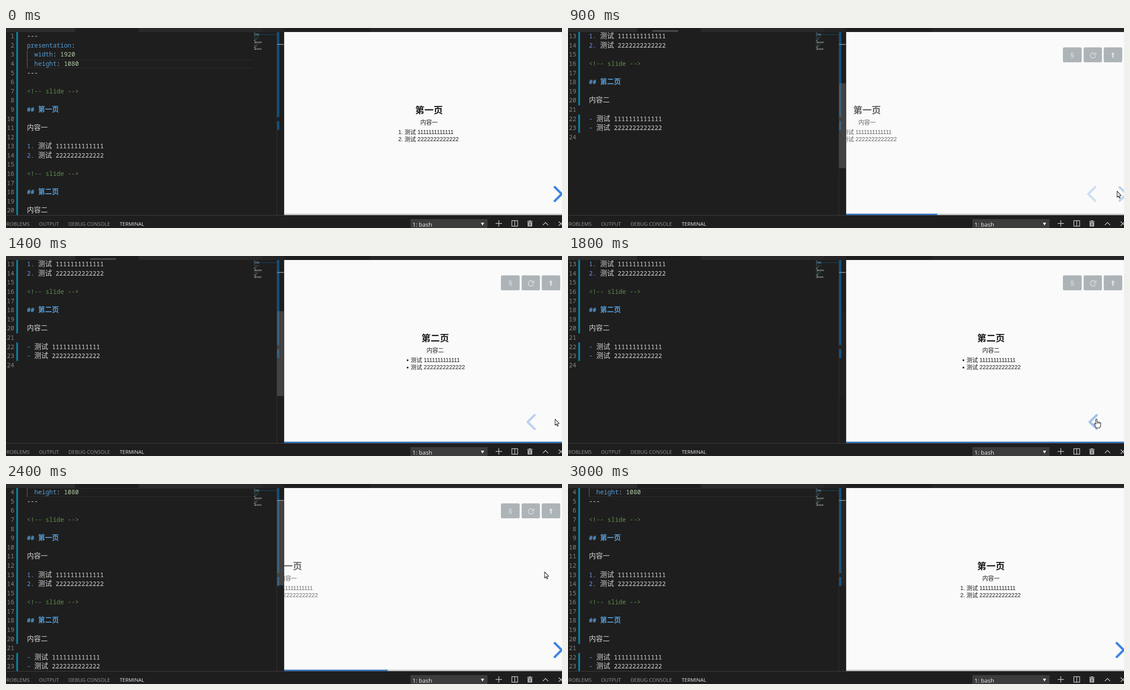
An HTML page with a canvas for the animation above (3200 ms loop, 1247 px wide and 449 px high).

```html
<!DOCTYPE html>
<html lang="zh">
<head>
<meta charset="utf-8">
<title>Slide preview</title>
<style>
  html, body { margin: 0; width: 100%; height: 100%; overflow: hidden; background: #1e1e1e; }
  canvas { display: block; }
</style>
</head>
<body>
<canvas id="stage" width="1247" height="449"></canvas>
<script>
const ctx = document.getElementById('stage').getContext('2d');
const LOOP = 3200, STEP = 100;
const MONO = '13.85px "Noto Sans Mono", monospace';
const HAN = '15.5px "Noto Sans CJK SC", "Noto Sans CJK", sans-serif';
const SLIDE = '"Liberation Sans", "Noto Sans CJK SC", "Noto Sans CJK", sans-serif';
const UI = '"Open Sans", sans-serif';

// Editor
const LINE = 20.58, TOP = 9, BOTTOM = 420;
const PLAIN = '#d4d4d4', BLUE = '#569cd6', LIST = '#6796e6', GREEN = '#608b4e', NUM = '#b5cea8';
const ONES = '1'.repeat(13), TWOS = '2'.repeat(13);
const rule = [['---', PLAIN]], blank = [], slideTag = [['<!-- slide -->', GREEN]];
const setting = (key, value) => [['  ' + key, BLUE], [': ', PLAIN], [value, NUM]];
const heading = s => [['## ' + s, BLUE, true]];
const item = (mark, digits) => [[mark, LIST], [' 测试 ' + digits, PLAIN]];
const code = [
  rule, [['presentation', BLUE], [':', PLAIN]], setting('width', '1920'), setting('height', '1080'), rule, blank,
  slideTag, blank, heading('第一页'), blank, [['内容一', PLAIN]], blank, item('1.', ONES), item('2.', TWOS), blank,
  slideTag, blank, heading('第二页'), blank, [['内容二', PLAIN]], blank, item('-', ONES), item('-', TWOS), blank
];

// Moments of the two slide changes
const NEXT = 820, BACK = 2214;

const clamp = v => Math.max(0, Math.min(1, v));

function bezier(x1, y1, x2, y2) {
  const at = (u, a, b) => 3 * (1 - u) ** 2 * u * a + 3 * (1 - u) * u * u * b + u ** 3;
  return x => {
    if (x <= 0) return 0;
    if (x >= 1) return 1;
    let lo = 0, hi = 1;
    for (let i = 0; i < 30; i++) {
      const mid = (lo + hi) / 2;
      if (at(mid, x1, x2) < x) lo = mid; else hi = mid;
    }
    return at(lo, y1, y2);
  };
}
const slideEase = bezier(0.26, 0.86, 0.44, 0.985);
const ease = bezier(0.25, 0.1, 0.25, 1);
const fade = (t, start) => ease((t - start) / 200);

function rect(x, y, w, h, color) {
  ctx.fillStyle = color;
  ctx.fillRect(x, y, w, h);
}

function text(s, x, y, font, color, align = 'left') {
  ctx.font = font;
  ctx.fillStyle = color;
  ctx.textAlign = align;
  ctx.fillText(s, x, y);
}

function stroke(color, width, ...paths) {
  ctx.strokeStyle = color;
  ctx.lineWidth = width;
  ctx.beginPath();
  for (const p of paths) p.forEach(([x, y], i) => i ? ctx.lineTo(x, y) : ctx.moveTo(x, y));
  ctx.stroke();
}

function clipped(x, y, w, h, draw) {
  ctx.save();
  ctx.beginPath();
  ctx.rect(x, y, w, h);
  ctx.clip();
  draw();
  ctx.restore();
}

function codeLine(parts, x, y) {
  for (const [str, color, bold] of parts) {
    for (const run of str.match(/[\u4e00-\u9fff]+|[^\u4e00-\u9fff]+/g)) {
      const font = (bold ? 'bold ' : '') + (run > '\u4e00' ? HAN : MONO);
      text(run, x, y, font, color);
      x += ctx.measureText(run).width;
    }
  }
}

function minimap() {
  rect(555, 14, 53, 1.5, '#16405c');
  code.forEach((parts, i) => {
    let x = 556;
    const y = 10.5 + i * 1.68;
    for (const [str, color] of parts) {
      for (const ch of str) {
        const han = ch > '\u4e00', w = han ? 1.6 : 0.85;
        ctx.globalAlpha = han ? 0.8 : 0.5;
        if (ch !== ' ') rect(x, y, w, 1.4, color);
        x += w;
      }
    }
  });
  ctx.globalAlpha = 1;
}

function editor(t) {
  const scroll = t < 850 ? 0 : t < 2250 ? 12 : 3;
  const lineTop = n => TOP + (n - 1 - scroll) * LINE;
  const shown = scroll === 12 ? 1 - 0.92 * clamp((t - 1400) / 400)
    : scroll === 3 ? 1 - 0.8 * clamp((t - 2400) / 400) : 0;

  clipped(0, TOP, 624, BOTTOM - TOP, () => {
    rect(47, Math.round(lineTop(4)), 508, 1, '#2f2f2f');
    rect(47, Math.round(lineTop(5)) - 2, 508, 1, '#2f2f2f');
    rect(47, lineTop(3), 1, 2 * LINE - 1, '#707070');
    rect(23, lineTop(1), 4, 20 * LINE, '#0c7d9d');
    rect(23, lineTop(22), 4, 2 * LINE, '#0c7d9d');
    code.forEach((parts, i) => {
      const y = lineTop(i + 1) + 14.3;
      text(i + 1, 18.5, y, MONO, '#858585', 'right');
      codeLine(parts, 47, y);
    });
    minimap();
    rect(607, TOP, 1, 411, '#343434');
    rect(608, TOP, 5, 191, '#10507f');
    rect(608, 209, 5, 20, '#10507f');
    rect(608, 8 + 9.67 * scroll, 15, 190.5, `rgba(121,121,121,${0.4 * shown})`);
    rect(608, 36, 15, 1.5, '#a0a0a0');
    rect(623, TOP, 1, 411, '#3c3c3c');
  });
  if (scroll === 12) rect(189, 5, 58, 3.5, `rgba(121,121,121,${0.5 * shown})`);
}

function tabStrip() {
  rect(0, 0, 1247, TOP, '#252526');
  rect(0, 0, 155, TOP, '#2d2d2d');
  rect(155, 0, 143, TOP, '#1e1e1e');
  rect(298, 0, 277, TOP, '#2a2a2b');
  rect(624, 0, 193, TOP, '#1e1e1e');
}

function slide(name, dx, alpha, ordered) {
  if (alpha <= 0) return;
  const ink = '#1a1a1a', body = '12.8px ' + SLIDE;
  ctx.save();
  ctx.globalAlpha = alpha;
  ctx.translate(dx, 0);
  text(`第${name}页`, 948.7, 191.7, 'bold 20.6px ' + SLIDE, ink, 'center');
  text(`内容${name}`, 948.7, 215.5, '12.9px ' + SLIDE, ink, 'center');
  [ONES, TWOS].forEach((digits, i) => {
    const y = 237.7 + i * 16.4;
    if (ordered) text(`${i + 1}.`, 890.3, y, body, ink, 'right');
    else {
      ctx.beginPath();
      ctx.arc(886.8, y - 3.6, 2, 0, 7);
      ctx.fillStyle = ink;
      ctx.fill();
    }
    text('测试 ' + digits, 893.7, y, body, ink);
  });
  ctx.restore();
}

// dir 1 points right, -1 points left; hovering flattens the angle
function chevron(x, dir, alpha, hover) {
  if (alpha <= 0) return;
  const a = (45 - 5 * hover) * Math.PI / 180;
  const dx = -dir * 22 * Math.cos(a), dy = 22 * Math.sin(a), y = 372.7;
  ctx.save();
  ctx.globalAlpha = alpha;
  ctx.lineCap = ctx.lineJoin = 'round';
  stroke('#2a76dd', 5.2, [[x + dx, y - dy], [x, y], [x + dx, y + dy]]);
  ctx.restore();
}

function toolbar() {
  const light = '#e1e5e7';
  for (const [x, w] of [[1110, 42], [1156.5, 41], [1201.5, 41.5]]) {
    ctx.beginPath();
    ctx.roundRect(x, 43.5, w, 33.5, 3);
    ctx.fillStyle = '#adb4b7';
    ctx.fill();
  }
  text('§', 1131, 66, '15px "Liberation Sans", sans-serif', light, 'center');
  ctx.beginPath();
  ctx.arc(1177.5, 61.5, 6, 0.3, 5.5);
  ctx.strokeStyle = light;
  ctx.lineWidth = 1.4;
  ctx.stroke();
  stroke(light, 1.4, [[1184, 55], [1184, 60], [1178.5, 60]]);
  rect(1220.7, 58, 2.8, 9, light);
  polygon([[1218, 59.5], [1222, 54.5], [1226, 59.5]], light);
}

function polygon(points, fill, outline) {
  ctx.beginPath();
  points.forEach(([x, y]) => ctx.lineTo(x, y));
  ctx.closePath();
  ctx.fillStyle = fill;
  ctx.fill();
  if (!outline) return;
  ctx.strokeStyle = outline;
  ctx.lineWidth = 1.1;
  ctx.stroke();
}

const cursorPath = [[300, 1237, 140], [500, 1231, 366], [1450, 1231, 366], [1700, 1185, 366],
  [2220, 1185, 366], [2400, 1207.5, 197], [2500, 1232, 95]];

function cursor(t) {
  const i = cursorPath.findIndex(p => p[0] >= t);
  if (t < 300 || i < 0) return;
  const b = cursorPath[i], a = cursorPath[Math.max(0, i - 1)];
  const k = a === b ? 0 : (t - a[0]) / (b[0] - a[0]);
  const hand = (t >= 480 && t < NEXT) || (t >= 1700 && t < BACK);
  ctx.save();
  ctx.translate(a[1] + (b[1] - a[1]) * k, a[2] + (b[2] - a[2]) * k);
  ctx.lineJoin = 'round';
  if (hand) {
    polygon([[-1.5, 1], [0, 0], [1.5, 1], [1.5, 7], [4, 6.5], [4.7, 7.5], [7, 7], [7.7, 8.3], [9.5, 8.5],
      [10, 10], [9.5, 15], [7.5, 20], [0, 20], [-2, 16], [-5, 12], [-4.5, 10], [-3, 10.3], [-1.5, 12]], '#fff', '#111');
    stroke('#111', 0.9, [[1.5, 7], [1.5, 11]], [[4.5, 7.5], [4.5, 11]], [[7.4, 8], [7.4, 11]]);
  } else {
    polygon([[0.5, 0.5], [0.5, 14], [3.5, 11.2], [5.6, 16], [7.6, 15.2], [5.6, 10.5], [9.7, 10.2]], '#fff', '#111');
  }
  ctx.restore();
}

function preview(t) {
  const pos = slideEase((t - NEXT) / 750) - slideEase((t - BACK) / 750);
  const swap = fade(t, NEXT) - fade(t, BACK);
  const hoverNext = fade(t, 480) - fade(t, NEXT);
  const hoverBack = fade(t, 1770) - fade(t, BACK);
  const travel = 863;
  clipped(624, TOP, 623, BOTTOM - TOP, () => {
    rect(624, TOP, 623, 411, '#fafafa');
    slide('一', -travel * pos, 1 - pos, true);
    slide('二', travel * (1 - pos), pos, false);
    rect(624, 416.8, 623, 4, '#c8c8c8');
    rect(624, 416.8, 623 * Math.min(1, pos * 1.017), 4, '#3674c8');
    chevron(1246.3 + 10 * swap, 1, (0.9 + 0.1 * hoverNext) * (1 - swap), hoverNext);
    chevron(1170 - 10 * (1 - swap), -1, (0.3 + 0.7 * hoverBack) * swap, hoverBack);
    if (t >= 300 && t < 2600) toolbar();
    cursor(t);
  });
}

function panel() {
  const font = '11.4px ' + UI, grey = '#969696', icon = '#c5c5c5';
  rect(0, 420, 1247, 29, '#1e1e1e');
  rect(0, 420, 1247, 1, '#414141');
  text('PROBLEMS', 53, 444.3, font, grey, 'right');
  text('OUTPUT', 74, 444.3, font, grey);
  text('DEBUG CONSOLE', 140, 444.3, font, grey);
  text('TERMINAL', 255, 444.3, font, '#e7e7e7');
  rect(907, 429, 173, 20, '#3c3c3c');
  text('1: bash', 911.5, 445.8, '13.2px ' + UI, '#f0f0f0');
  polygon([[1065, 437], [1072.5, 437], [1068.7, 443.5]], '#f0f0f0');
  stroke(icon, 1.5, [[1098, 438.7], [1112.5, 438.7]], [[1105.3, 431.5], [1105.3, 446]],
    [[1204, 442.5], [1210, 436.5], [1216, 442.5]],
    [[1239.5, 434.5], [1249, 444]], [[1239.5, 444], [1249, 434.5]]);
  ctx.strokeRect(1134.5, 432.5, 13, 12.5);
  stroke(icon, 1.5, [[1141, 432.5], [1141, 445]]);
  rect(1169, 433.5, 12, 1.5, icon);
  rect(1172.5, 432, 5, 1.5, icon);
  rect(1170, 436, 10, 9.5, icon);
  stroke('#1e1e1e', 0.9, [[1173, 437.5], [1173, 444]], [[1175, 437.5], [1175, 444]], [[1177, 437.5], [1177, 444]]);
}

function draw(now) {
  const t = Math.floor((now % LOOP) / STEP) * STEP;
  rect(0, 0, 1247, 449, '#1e1e1e');
  tabStrip();
  editor(t);
  preview(t);
  panel();
}

const start = performance.now();
function tick() {
  draw(performance.now() - start);
  requestAnimationFrame(tick);
}
tick();
</script>
</body>
</html>
```
